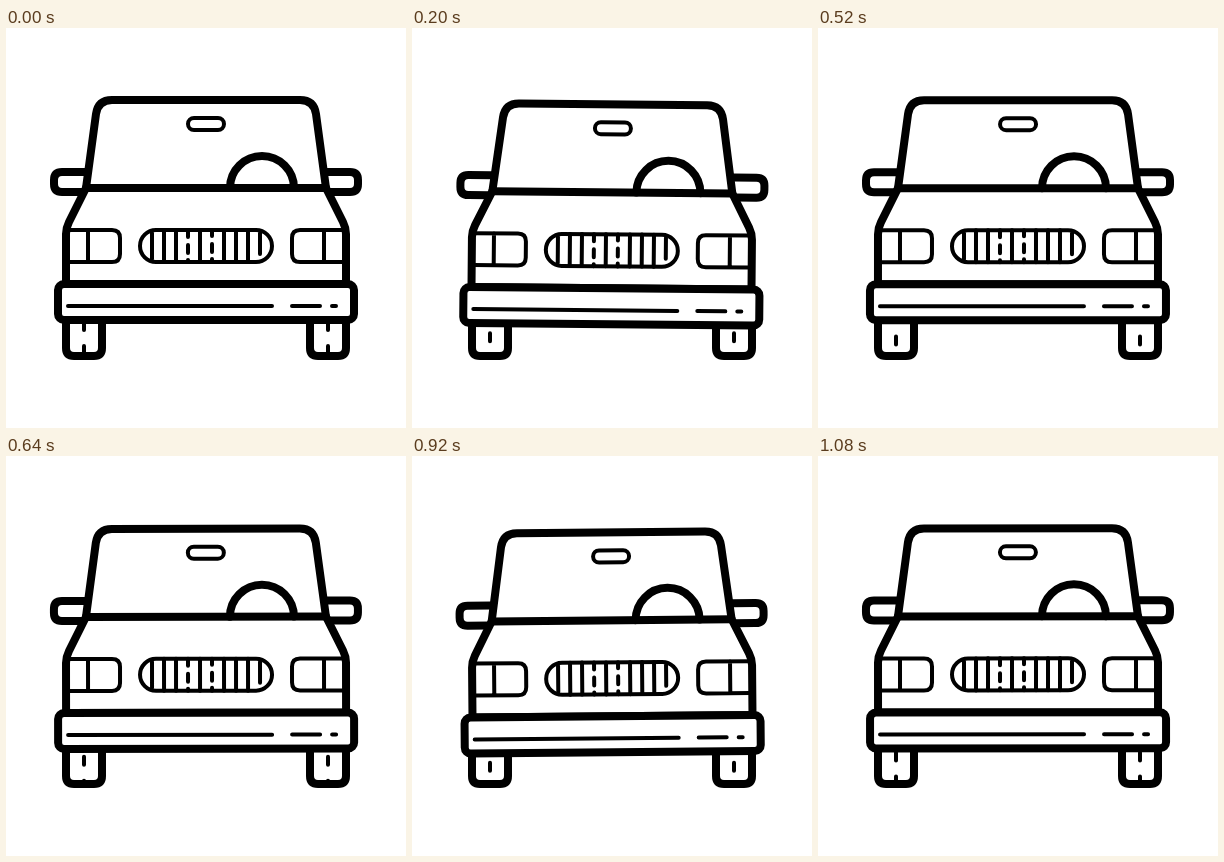
Recreate the animation shown at these times as an HTML page. Size 400x400 px, loop 1.12 s.

```html
<!DOCTYPE html>
<html>
<head>
<meta charset="utf-8">
<style>
  html, body { margin: 0; width: 100%; height: 100%; overflow: hidden; background: #fff; }
  svg { display: block; width: 100vw; height: 100vh; }
</style>
</head>
<body>
<svg viewBox="0 0 400 400" fill="none" stroke="#000" stroke-width="8" stroke-linecap="round" stroke-linejoin="round">
  <defs>
    <g id="wheel">
      <path d="M60 286V320Q60 328 68 328H88Q96 328 96 320V286"/>
      <path class="tread" d="M78 270V326" stroke-width="4" stroke-dasharray="8 16"/>
    </g>
    <g id="side">
      <path d="M79 144H56Q48 144 48 152V156Q48 164 56 164H77"/>
    </g>
    <g id="lamp" stroke-width="4">
      <path d="M62 202H106Q114 202 114 210V226Q114 234 106 234H62M82 202V234"/>
    </g>
  </defs>

  <use href="#wheel"/>
  <use href="#wheel" x="244"/>

  <g id="car">
    <use href="#side"/>
    <use href="#side" transform="matrix(-1 0 0 1 400 0)"/>
    <path fill="#fff" d="M60 256V206Q60 200 63 194L80 160L90 86Q92 72 106 72H294Q308 72 310 86L320 160L337 194Q340 200 340 206V256Z"/>
    <path d="M80 160H320"/>
    <path d="M224 160a32 32 0 0 1 64 0"/>
    <use href="#lamp"/>
    <use href="#lamp" transform="matrix(-1 0 0 1 400 0)"/>
    <g stroke-width="4">
      <rect x="182" y="90" width="36" height="12" rx="6"/>
      <rect x="134" y="202" width="132" height="32" rx="16"/>
      <path d="M146 205V231M158 202V234M170 202V234M194 202V234M218 202V234M230 202V234M242 202V234M254 205V226"/>
      <path d="M182 202V209M182 217V225M182 232V234M206 202V208M206 216V224M206 231V234"/>
    </g>
    <rect x="52" y="256" width="296" height="36" rx="6" fill="#fff"/>
    <path stroke-width="4" d="M62 278H266M286 278H314M326 278H330"/>
  </g>
</svg>
<script>
  const LOOP = 1120, HALF = LOOP / 2, STEP = 40, PEAK = 240;
  const DROP = 4.7, TILT = 0.55, DASH = 24;
  const car = document.getElementById('car');
  const treads = document.querySelectorAll('.tread');
  const smooth = u => u * u * (3 - 2 * u);

  // Sinks until PEAK, then rises back by HALF
  const sink = t => smooth(t < PEAK ? t / PEAK : (HALF - t) / (HALF - PEAK));

  function draw(now) {
    const t = Math.floor(now % LOOP / STEP) * STEP;
    // The second half mirrors the first, leaning the other way
    const first = t < HALF;
    const s = sink(first ? t : LOOP - t);
    const angle = (first ? 1 : -1) * TILT * s;
    car.setAttribute('transform', `translate(0 ${DROP * s}) rotate(${angle} 200 200)`);
    // Treads roll upwards three dashes per loop
    const roll = t / LOOP * 3 * DASH;
    for (const tread of treads) tread.setAttribute('stroke-dashoffset', roll % DASH);
    requestAnimationFrame(() => draw(performance.now()));
  }
  draw(performance.now());
</script>
</body>
</html>
```
